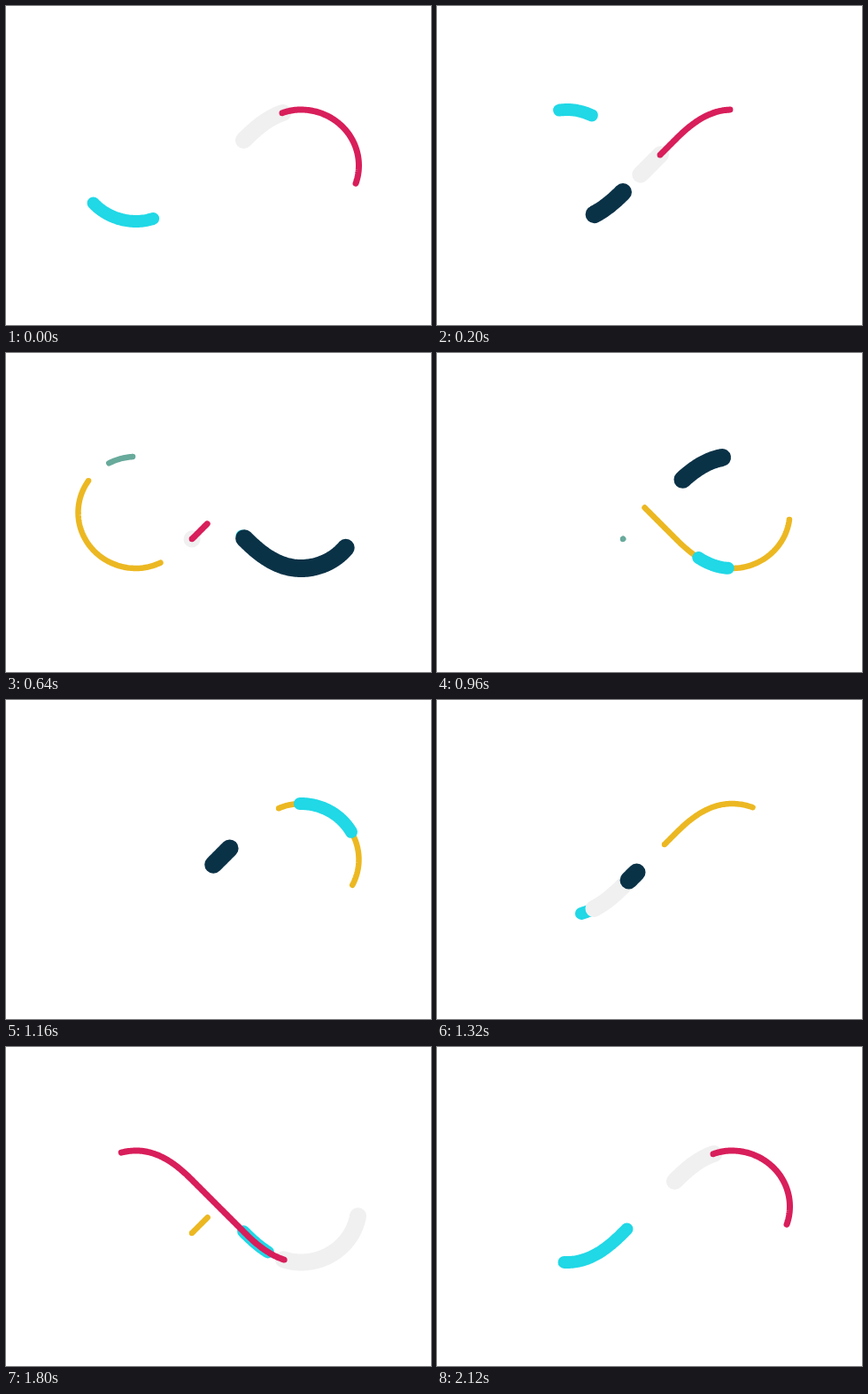
An HTML page with a canvas for the animation above (2160 ms loop, 480x360 px).

```html
<!DOCTYPE html>
<html>
<head>
<meta charset="utf-8">
<title>Infinity ribbons</title>
<style>
html, body { margin: 0; width: 100%; height: 100%; overflow: hidden; background: #fff; }
canvas { display: block; }
</style>
</head>
<body>
<canvas id="stage" width="480" height="360"></canvas>
<script>
const ctx = document.getElementById('stage').getContext('2d');
const LOOP = 2160, STEP = 40;

// --- Easing ---
const bezier = (a, b, c, d, t) => {
  const u = 1 - t;
  return u * u * u * a + 3 * u * u * t * b + 3 * u * t * t * c + t * t * t * d;
};

// Same curve as the CSS keyword "ease"
function ease(x) {
  let lo = 0, hi = 1;
  for (let i = 0; i < 24; i++) {
    const mid = (lo + hi) / 2;
    if (bezier(0, 0.25, 0.25, 1, mid) < x) lo = mid; else hi = mid;
  }
  return bezier(0, 0.1, 1, 1, lo);
}

const sine = x => (1 - Math.cos(Math.PI * x)) / 2;

// --- Figure eight: one half, then its mirror image ---
function addCurve(out, a, b, c, d) {
  for (let i = 1; i <= 40; i++) {
    out.push([0, 1].map(k => bezier(a[k], b[k], c[k], d[k], i / 40)));
  }
}

const half = [[210, 210], [270, 150]];
addCurve(half, [270, 150], [285, 135], [306, 117], [333, 117]);
for (let i = 1; i <= 120; i++) {
  const a = Math.PI * (i / 120 - 0.5);
  half.push([333 + 65.5 * Math.cos(a), 180 + 63 * Math.sin(a)]);
}
addCurve(half, [333, 243], [306, 243], [285, 225], [270, 210]);
const pts = half.concat(half.slice(1).map(([x, y]) => [480 - x, y]));

const dist = [0];
for (let i = 1; i < pts.length; i++) {
  dist.push(dist[i - 1] + Math.hypot(pts[i][0] - pts[i - 1][0], pts[i][1] - pts[i - 1][1]));
}
const L = dist[dist.length - 1];

function pointAt(s) {
  s = ((s % L) + L) % L;
  const i = dist.findIndex(d => d > s);
  const k = (s - dist[i - 1]) / (dist[i] - dist[i - 1]);
  return [0, 1].map(j => pts[i - 1][j] + k * (pts[i][j] - pts[i - 1][j]));
}

// --- Ribbons: head and tail each run one lap, given as [start, duration] in ms.
// "origin" is where the lap begins, "carry" the shift into the next loop,
// "lift" puts the carried-over part above the others.
const base = { ease, origin: L, carry: 2120, lift: false };
const ribbon = (color, width, head, tail, options) => ({ ...base, color, width, head, tail, ...options });

const CYAN = '#20d8e6';
const ribbons = [
  ribbon('#ecb822', 6.5, [391, 1400], [530, 1620]),
  ribbon('#68aa9b', 6.5, [560, 385], [560.6, 410]),
  ribbon(CYAN, 14, [778, 1000], [835, 1000], { ease: sine, origin: L / 2, carry: LOOP }),
  ribbon(CYAN, 14, [1737, 1125], [1797, 1115], { origin: L / 2, carry: LOOP, lift: true }),
  ribbon('#f0f0f0', 19, [1228, 1415], [1320, 1475]),
  ribbon('#d81e5b', 7, [1321, 1470], [1470, 1640]),
  ribbon('#0a3247', 20, [110, 1400], [245, 1350])
];

function progress([start, duration], t) {
  return Math.min(1, Math.max(0, (t - start) / duration));
}

function stroke(r, t) {
  const lead = progress(r.head, t), lag = progress(r.tail, t);
  if (lead === 0 || lag > 0.978) return;
  const a = r.origin - L * r.ease(lead);
  const b = Math.max(a, r.origin - L * r.ease(lag));
  ctx.strokeStyle = r.color;
  ctx.lineWidth = r.width;
  ctx.beginPath();
  const [x, y] = pointAt(a);
  ctx.moveTo(x, y);
  ctx.lineTo(x + 0.01, y);
  for (let s = a + 1.5; s < b; s += 1.5) ctx.lineTo(...pointAt(s));
  ctx.lineTo(...pointAt(b));
  ctx.stroke();
}

function draw(t) {
  ctx.fillStyle = '#fff';
  ctx.fillRect(0, 0, 480, 360);
  ctx.lineCap = ctx.lineJoin = 'round';
  const lifted = ribbons.filter(r => r.lift);
  const navy = ribbons[ribbons.length - 1];
  for (const r of ribbons) {
    if (r === navy) lifted.forEach(c => stroke(c, t + c.carry));
    stroke(r, t);
    if (!r.lift) stroke(r, t + r.carry);
  }
}

const start = performance.now();
function tick() {
  const t = (performance.now() - start) % LOOP;
  draw(Math.floor(t / STEP) * STEP);
  requestAnimationFrame(tick);
}
tick();
</script>
</body>
</html>
```
